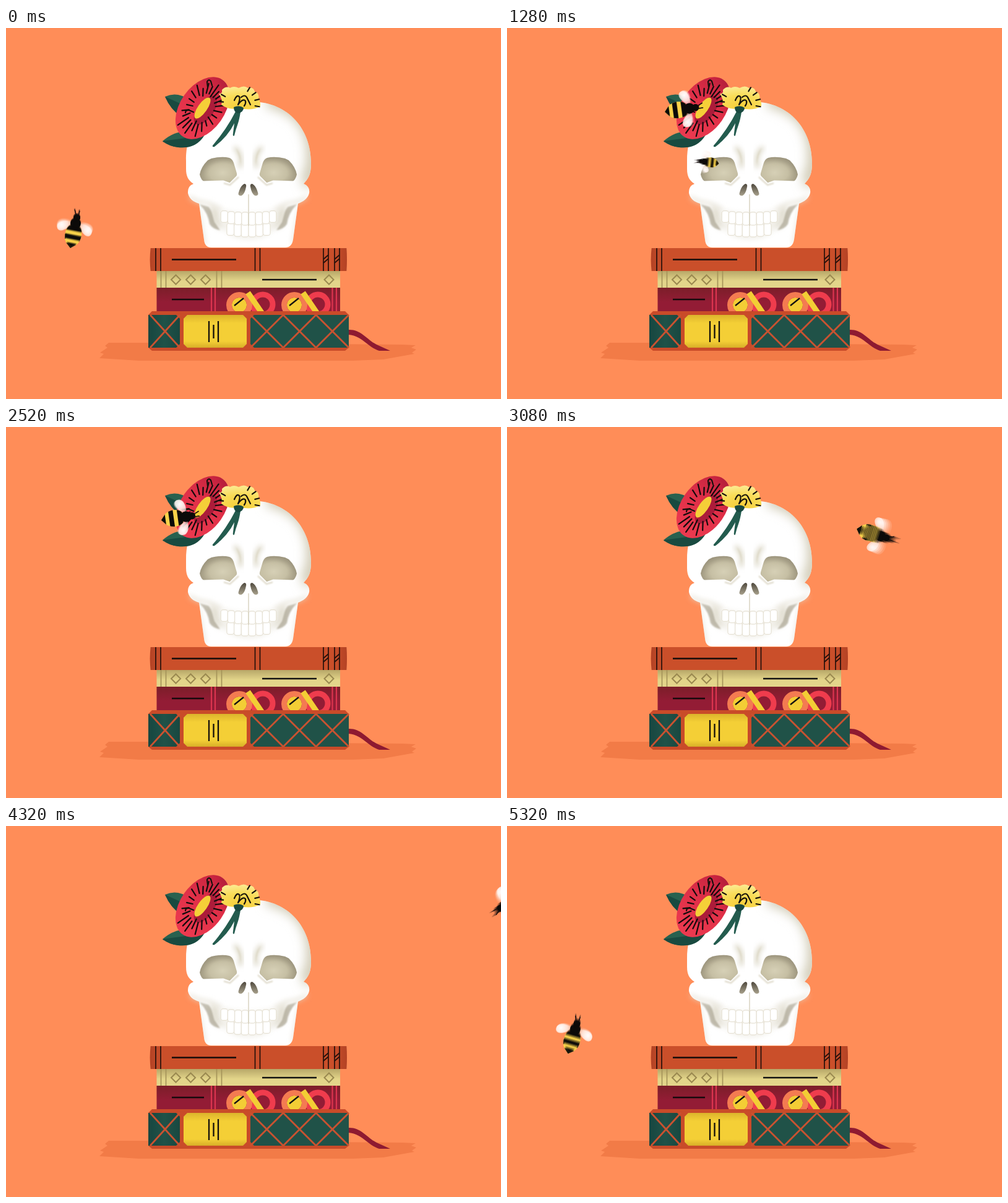
Recreate the animation shown at these times as an HTML page. Size 800x600 px, loop 5.36 s.

```html
<!DOCTYPE html>
<html lang="en">
<head>
<meta charset="utf-8">
<title>Skull, books and bees</title>
<style>
  html, body { margin: 0; width: 100%; height: 100%; overflow: hidden; background: #ff8d58; }
  svg { display: block; width: 100vw; height: 100vh; }
</style>
</head>
<body>
<svg viewBox="0 0 800 600" xmlns="http://www.w3.org/2000/svg">
<defs>
  <filter id="b1" x="-30%" y="-30%" width="160%" height="160%"><feGaussianBlur stdDeviation="1"/></filter>
  <filter id="b4" x="-50%" y="-50%" width="200%" height="200%"><feGaussianBlur stdDeviation="4"/></filter>
  <filter id="b9" x="-50%" y="-50%" width="200%" height="200%"><feGaussianBlur stdDeviation="9"/></filter>
  <linearGradient id="edge">
    <stop offset="0" stop-color="#5a1010" stop-opacity=".2"/><stop offset=".06" stop-color="#5a1010" stop-opacity="0"/>
    <stop offset=".93" stop-color="#5a1010" stop-opacity="0"/><stop offset="1" stop-color="#5a1010" stop-opacity=".2"/>
  </linearGradient>
  <linearGradient id="drop" x2="0" y2="1">
    <stop offset="0" stop-color="#3a2408" stop-opacity=".26"/><stop offset=".6" stop-color="#3a2408" stop-opacity="0"/>
  </linearGradient>
  <linearGradient id="label" x2="0" y2="1">
    <stop offset="0" stop-color="#dcb42c"/><stop offset=".25" stop-color="#f4cf36"/>
    <stop offset=".8" stop-color="#f4cf36"/><stop offset="1" stop-color="#d8ae28"/>
  </linearGradient>
  <linearGradient id="green">
    <stop offset="0" stop-color="#174640"/><stop offset=".5" stop-color="#205248"/><stop offset="1" stop-color="#194840"/>
  </linearGradient>
  <radialGradient id="hole" cx=".62" cy=".6" r=".65">
    <stop offset="0" stop-color="#d6d0b6"/><stop offset=".55" stop-color="#c6bfa4"/><stop offset="1" stop-color="#a09880"/>
  </radialGradient>
  <linearGradient id="nose" x2="0" y2="1">
    <stop offset="0" stop-color="#4f493e"/><stop offset="1" stop-color="#a8a18c"/>
  </linearGradient>
  <linearGradient id="petal">
    <stop offset="0" stop-color="#ec3a50"/><stop offset=".55" stop-color="#e03048"/><stop offset="1" stop-color="#c4233f"/>
  </linearGradient>
  <radialGradient id="fan" cx=".5" cy=".9" r=".85">
    <stop offset="0" stop-color="#f6cd38"/><stop offset=".6" stop-color="#f9dc58"/><stop offset="1" stop-color="#fbe98c"/>
  </radialGradient>
  <radialGradient id="wing" gradientUnits="userSpaceOnUse" cx="7" cy="-22" r="19">
    <stop offset="0" stop-color="#fff" stop-opacity=".92"/><stop offset=".5" stop-color="#fff0ea" stop-opacity=".66"/>
    <stop offset="1" stop-color="#ffe0d4" stop-opacity=".08"/>
  </radialGradient>
  <path id="head" d="M291 215C291 150 330 119 397 119C458 120 493 165 493 218C493 238 488 244 481 252C489 255 491 261 490 267C488 276 480 281 472 284L464 342Q462 355 451 355H332Q321 355 320 342L312 284C302 281 296 276 294 267C294 259 296 255 303 252C294 246 291 239 291 228Z"/>
  <clipPath id="inHead"><use href="#head"/></clipPath>
  <path id="eye" d="M332 211Q349 207 361 210Q366 212 368 218L373 235Q374 239 370 242L361 251L351 247L321 249Q315 246 313 237Q315 225 326 214Z"/>
  <clipPath id="inEye"><use href="#eye"/></clipPath>
  <clipPath id="inRed"><path d="M243 420H540V459H243Z"/></clipPath>
  <clipPath id="inFlower"><ellipse rx="56" ry="36"/></clipPath>
  <path id="belly" d="M-27 0L-20 -8C-13 -15 2 -15 8 -8V8C2 15 -13 15 -20 8Z"/>
  <clipPath id="inBelly"><use href="#belly"/></clipPath>

  <g id="half">
    <path d="M369 193Q383 204 378 226" fill="none" stroke="#cfc9b2" stroke-width="5" filter="url(#b4)"/>
    <path d="M371 194Q382 204 379 221Q377 204 371 194Z" fill="#ddd8c6" filter="url(#b1)"/>
    <use href="#eye" fill="url(#hole)"/>
    <g clip-path="url(#inEye)"><path d="M312 236Q321 206 366 209" fill="none" stroke="#7d7764" stroke-width="5" opacity=".5" filter="url(#b4)"/></g>
    <path d="M316 249L351 248L362 252L374 240" fill="none" stroke="#fff" stroke-width="3"/>
    <path d="M352 251L362 254L376 241" fill="none" stroke="#d9d3c1" stroke-width="2" filter="url(#b1)"/>
    <path d="M385 252Q389 252 388 257Q386 268 381 271Q374 272 376 266Q379 255 385 252Z" fill="url(#nose)"/>
    <path d="M329 288Q348 290 345 306L352 326Q337 324 331 309Z" fill="#d0cab6" opacity=".6" filter="url(#b4)"/>
    <path d="M313 285L327 289C333 294 334 306 337 314L346 327Q334 325 329 317Q327 300 313 285Z" fill="#a39c88" opacity=".65" filter="url(#b1)"/>
    <path d="M297 273Q307 282 329 284L349 294" fill="none" stroke="#e2ddcf" stroke-width="4" filter="url(#b4)"/>
  </g>

  <g id="knot" fill="none">
    <circle cx="415" cy="447" r="16" stroke="#ef3c4d" stroke-width="9"/>
    <circle cx="377" cy="448" r="12" fill="#f3cd35"/>
    <circle cx="377" cy="448" r="16.500" stroke="#f47b51" stroke-width="9"/>
    <path d="M391 428L415 463" stroke="#f3cd35" stroke-width="9"/>
    <path d="M369 449L384 437" stroke="#111" stroke-width="2.3"/>
  </g>
  <path id="diamond" d="M-7.5 0L0 -7.5L7.5 0L0 7.5Z" fill="none" stroke="#9a8950" stroke-width="2"/>
  <path id="wingShape" d="M14 -4C5 -10 -6 -22 1 -28C8 -32 18 -26 15 -5Z" fill="url(#wing)"/>

  <g id="body">
    <use href="#belly" fill="#f8d24a"/>
    <g clip-path="url(#inBelly)" fill="#0c0a09"><path d="M-30 -18H-20V18H-30ZM-14 -18H-6.500V18H-14ZM0 -18H10V18H0Z"/></g>
    <g fill="#0c0a09"><circle cx="13" r="8.500"/><circle cx="23" r="5.500"/></g>
    <path d="M26 -2L35 -6M26 2L35 2" stroke="#1c1010" stroke-width="1.3"/>
  </g>
</defs>

<path fill="#ff8d58" d="M0 0H800V600H0Z"/>
<path fill="#f27b47" d="M166 509L230 509L640 512L662 513L655 517L663 520L656 525L660 527L610 536L560 538L215 538L151 534L158 527L152 525L164 517L160 514Z"/>
<path d="M553 488C574 487 583 504 599 512L621 522L603 522C584 516 575 497 553 496Z" fill="#8e1a31"/>

<!-- books -->
<g>
  <path d="M234 356H550Q552 374 550 393H234Q231 374 234 356Z" fill="#ca4f2a"/>
  <path d="M233 356H551V393H233Z" fill="url(#edge)"/>
  <g id="bands" stroke="#24100b" stroke-width="1.7"></g>
  <path d="M268 374.500H372" stroke="#130b09" stroke-width="2.3"/>
</g>
<g>
  <path d="M243.500 393H540V420H243.500Z" fill="#e3d58a"/>
  <path d="M243.500 393H540V420H243.500Z" fill="url(#drop)"/>
  <path d="M250.500 393V420M258.500 393V420M340.500 393V420M348.500 393V420" stroke="#a5945a" stroke-width="1.7"/>
  <use href="#diamond" x="274.500" y="407"/><use href="#diamond" x="298.500" y="407"/>
  <use href="#diamond" x="322.500" y="407"/><use href="#diamond" x="522" y="407"/>
  <path d="M414 407H502" stroke="#111" stroke-width="2.3"/>
</g>
<g clip-path="url(#inRed)">
  <path d="M243.500 420H540V459H243.500Z" fill="#931c35"/>
  <path d="M243.500 420H540V459H243.500Z" fill="url(#drop)"/>
  <path d="M332 420V459M338 420V459M527.500 420V459M534 420V459" stroke="#dc3450" stroke-width="2.2"/>
  <path d="M268 439H320" stroke="#160a0c" stroke-width="2.3"/>
  <use href="#knot"/><use href="#knot" x="89"/>
</g>
<g>
  <path d="M236 458H548L554 464V517L548 522H236L230 517V464Z" fill="#c94b29"/>
  <path d="M230 464H275L281 470V511L275 517H230Z" fill="url(#green)"/>
  <path d="M293 464H383L389 470V511L383 517H293L287 511V470Z" fill="url(#label)"/>
  <path d="M401 464H554V517H401L395 511V470Z" fill="#205248"/>
  <g id="crosses" stroke="#ca5230" stroke-width="2.8"></g>
  <path d="M328 474V508M335.500 480V502M343 474V508" stroke="#15100a" stroke-width="2.3"/>
</g>

<!-- skull -->
<use href="#head" fill="#fff"/>
<g clip-path="url(#inHead)">
  <path d="M422 117C490 130 501 180 496 224Q491 246 480 250" fill="none" stroke="#cec8b1" stroke-width="22" filter="url(#b9)"/>
  <path d="M286 170V250" stroke="#cdc7b0" stroke-width="13" filter="url(#b9)"/>
  <path d="M310 290L321 350M474 290L464 350" stroke="#e0dccf" stroke-width="4" filter="url(#b4)"/>
</g>
<use href="#half"/>
<use href="#half" transform="translate(783 0) scale(-1 1)"/>
<path d="M349 294Q392 306 436 294L434 318Q426 342 392 341Q358 342 351 318Z" fill="#d8d2bf" opacity=".35" filter="url(#b4)"/>
<g id="teeth" fill="#fff" stroke="#e6e1d4" stroke-width="1.2"></g>
<path d="M392 269V320" stroke="#d9d3c2" stroke-width="1.5"/>

<!-- flowers -->
<path d="M257 111Q276 102 297 116L283 143Q266 132 257 111Z" fill="#28614f"/>
<path d="M257 111L290 126L283 143Q266 132 257 111Z" fill="#194a40"/>
<path d="M253 183Q282 157 321 173Q307 196 278 193Q263 191 253 183Z" fill="#28614f"/>
<path d="M253 183L320 174Q307 196 278 193Q263 191 253 183Z" fill="#194a40"/>
<g transform="translate(317.500 129.500) rotate(-55)">
  <ellipse rx="56" ry="36" fill="url(#petal)"/>
  <g clip-path="url(#inFlower)">
    <ellipse cy="6" rx="27" ry="13" fill="#ac1c3a"/>
    <path d="M20 39Q53 25 57 -2" fill="none" stroke="#ac1c3a" stroke-width="18" opacity=".6" filter="url(#b4)"/>
  </g>
  <ellipse rx="20" ry="7.500" fill="#f5cf38"/>
  <g id="rays" stroke="#120b0c" stroke-width="2.2" stroke-linecap="round"></g>
</g>
<path d="M344 106Q350 107 349 100Q356 93 362 97Q368 93 376 97Q385 92 391 97Q400 95 402 103Q410 105 408 115Q412 119 411 127Q394 135 377 129Q361 134 348 124Q351 117 344 106Z" fill="url(#fan)"/>
<g fill="none" stroke="#14110b" stroke-width="2.2" stroke-linecap="round" stroke-linejoin="round">
  <path d="M326 96L325 87Q327 82 331 86L333 93M290 137Q290 132 296 133L303 136"/>
  <path d="M369 117Q373 107 377 111Q379 115 375 124Q383 113 387 118Q388 122 385 126M380 112Q386 107 389 112L395 124"/>
  <g id="lashes"></g>
</g>
<path d="M371 135L379 136Q377 148 375 154Q371 165 369 174Q366 176 367 170L369 154Q359 175 337 192Q333 193 334 190Q357 163 371 135Z" fill="#235b4e"/>
<path d="M368 128Q377 124 384 129Q384 136 375 138Q368 136 368 128Z" fill="#194a40"/>

<g id="bees"></g>
</svg>
<script>
const NS = 'http://www.w3.org/2000/svg', TAU = 2 * Math.PI;
const LOOP = 5360, SAMPLES = 5, SHUTTER = 12;
const byId = id => document.getElementById(id);

function add(parent, tag, attrs) {
  const el = document.createElementNS(NS, tag);
  for (const k in attrs) el.setAttribute(k, attrs[k]);
  return parent.appendChild(el);
}
const line = (id, x1, y1, x2, y2) => add(byId(id), 'line', { x1, y1, x2, y2 });

let seed = 7;
const rand = () => (seed = seed * 16807 % 2147483647) / 2147483647;

// Curved rows of teeth, centred under the nose
function teeth(count, width, top) {
  for (let i = 0; i < count; i++) {
    const off = (i - count / 2) * width, k = (off + width / 2) / 45;
    add(byId('teeth'), 'rect', { x: 392 + off, y: top - 3 * k * k, width, height: 21 - 3 * k * k, rx: 4 });
  }
}
teeth(6, 11.7, 317);
teeth(8, 11.2, 298);

// Spine bands, with slanted ticks on the right pairs
for (const x of [242, 402.5, 513, 531]) {
  for (const dx of [0, 8]) line('bands', x + dx, 356, x + dx, 393);
  if (x > 500) for (const y of [374, 380]) line('bands', x, y, x + 8, y - 7);
}

function cross(x, w) {
  line('crosses', x, 464, x + w, 517);
  line('crosses', x + w, 464, x, 517);
}
cross(233, 48);
for (let i = 0; i < 3; i++) cross(395 + 53 * i, 53);

// Stamens fan out around the flower hearts
for (let i = 0; i < 24; i++) {
  const a = i / 24 * TAU, r = .42 + .14 * rand(), s = r + .2 + .24 * rand();
  line('rays', 54 * r * Math.cos(a), 35 * r * Math.sin(a), 54 * s * Math.cos(a), 35 * s * Math.sin(a));
}
for (let i = 0; i < 9; i++) {
  const a = (10 - 23 * i) * Math.PI / 180, c = Math.cos(a), s = Math.sin(a);
  if (i < 4 || i > 6) line('lashes', 377 + 26 * c, 122 + 23 * s, 377 + 33 * c, 122 + 30 * s);
}

// Flights are Bezier curves; a bee looks where it flies
function flight(t0, t1, a, b, c, d, size = () => 1) {
  return t => {
    const u = (t - t0) / (t1 - t0), v = 1 - u;
    if (u < 0 || u >= 1) return null;
    const at = i => v * v * v * a[i] + 3 * u * v * v * b[i] + 3 * u * u * v * c[i] + u * u * u * d[i];
    const speed = i => v * v * (b[i] - a[i]) + 2 * u * v * (c[i] - b[i]) + u * u * (d[i] - c[i]);
    return { x: at(0), y: at(1), turn: Math.atan2(speed(1), speed(0)) * 360 / TAU, size: size(u) };
  };
}

const LAND = 587, LIFT = 2600, REST = -8;
const arrive = flight(-480, 0, [-30, 640], [40, 520], [102, 368], [110, 328]);
const approach = flight(0, LAND, [110, 328], [116, 295], [194, 98], [300, 144]);
const depart = flight(LIFT, 3480, [276, 146], [346, 90], [783, 194], [835, 316]);
const comeOut = flight(1140, 2160, [356, 232], [308, 169], [54, 303], [-30, 530], u => .92 * Math.min(1, u / .21));
const goIn = flight(4240, 5280, [860, 95], [665, 226], [515, 219], [440, 230], u => 1 - .9 * u ** 2.2);

// Damped sway in front of the red flower
function hover(t) {
  if (t < LAND || t >= LIFT) return null;
  const s = t - LAND;
  return {
    x: 278 + 22 * Math.exp(-s / 900) * Math.cos(TAU * s / 850),
    y: 135 - 12 * Math.cos(TAU * (t - 1630) / 1700),
    turn: REST + 31 * Math.exp(-s / 120), size: 1
  };
}

function visitor(t) {
  if (t > 4200) t -= LOOP;
  const p = arrive(t) || approach(t) || hover(t) || depart(t);
  if (p && t >= LIFT) p.turn = REST + (p.turn - REST) * Math.min(1, (t - LIFT) / 200);
  return p;
}
const dweller = t => comeOut(t) || goIn(t);

// A bee is several overlaid copies whose opacities average into a short exposure
function makeBee() {
  const root = add(byId('bees'), 'g', {});
  return Array.from({ length: SAMPLES }, (_, i) => {
    const g = add(root, 'g', { opacity: 1 / (i + 1) });
    const wings = [1, -1].map(() => add(g, 'use', { href: '#wingShape' }));
    add(g, 'use', { href: '#body' });
    return { g, wings };
  });
}

function drawBee(copies, poseAt, t) {
  copies.forEach(({ g, wings }, i) => {
    const s = t + (i / (SAMPLES - 1) - .5) * SHUTTER, p = poseAt(s);
    g.style.display = p ? '' : 'none';
    if (!p) return;
    g.setAttribute('transform', `translate(${p.x} ${p.y}) rotate(${p.turn}) scale(${p.size})`);
    const flap = 8 * Math.sin(s * TAU / 67);
    wings.forEach((w, k) => w.setAttribute('transform', `scale(1 ${k ? -1 : 1}) rotate(${flap} 14 -4)`));
  });
}

const beeA = makeBee(), beeB = makeBee();
function draw(t) {
  drawBee(beeA, visitor, t);
  drawBee(beeB, dweller, t);
}

let start = null;
function tick(now) {
  if (start === null) start = now;
  draw((now - start) % LOOP);
  requestAnimationFrame(tick);
}
draw(0);
requestAnimationFrame(tick);
</script>
</body>
</html>
```
